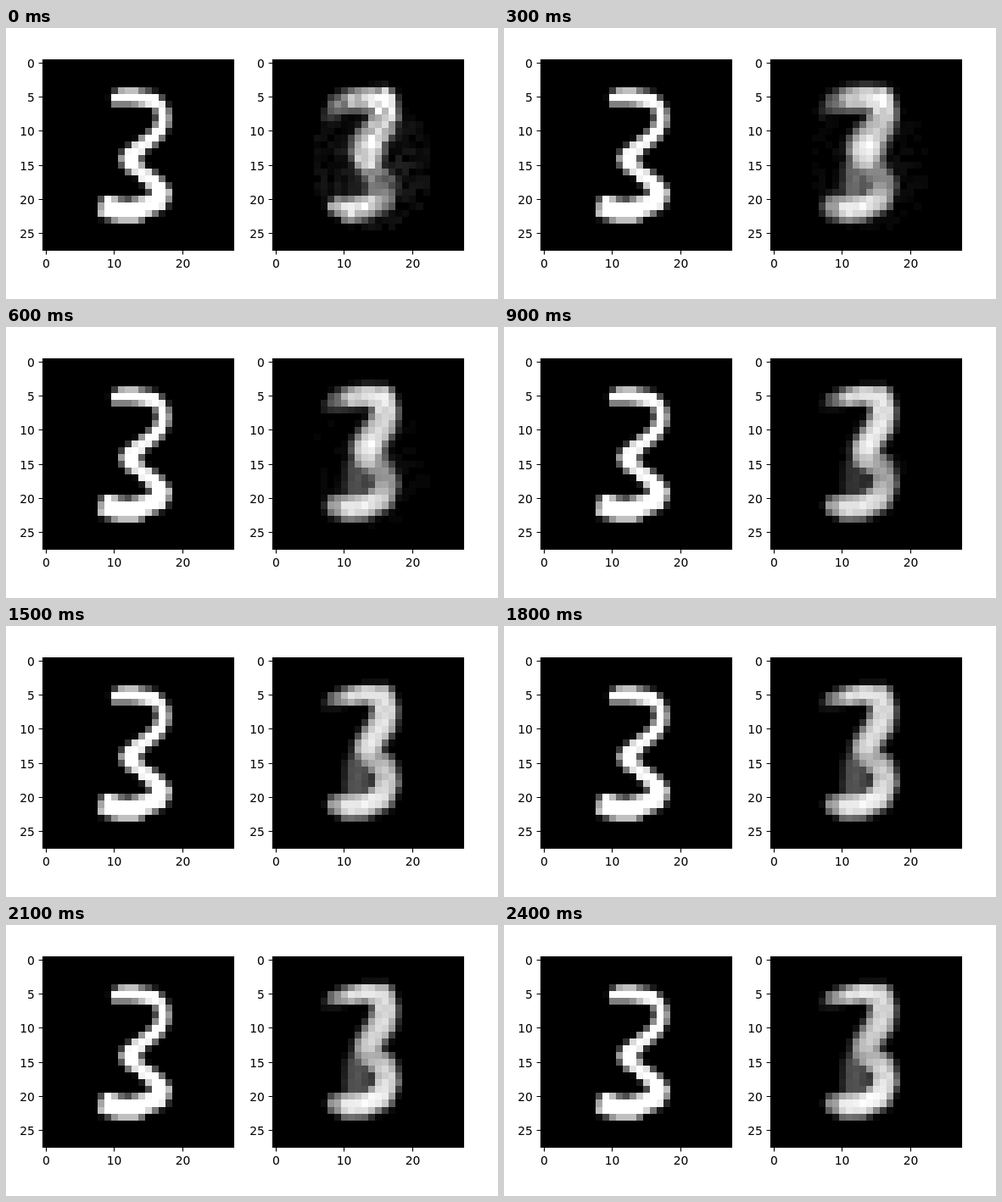
An HTML page with a canvas that plays this animation: 580x320 px, repeating every 3 s.

```html
<!DOCTYPE html>
<html lang="en">
<head>
<meta charset="utf-8">
<title>Learning a digit</title>
<style>
  html, body { margin: 0; width: 100%; height: 100%; overflow: hidden; background: #fff; }
  canvas, svg { position: absolute; left: 0; top: 0; width: 580px; height: 320px; }
  text { font: 13.89px "DejaVu Sans", sans-serif; fill: #000; }
  path { fill: none; stroke: #000; stroke-width: 1.1; }
</style>
</head>
<body>
<canvas id="view" width="580" height="320"></canvas>
<svg id="axes" viewBox="0 0 580 320"></svg>
<script>
const N = 28, CELL = 8.05, TOP = 37.4, LEFT = [43.4, 314.4];
const STEP = 300, LOOP = 3000, LAST = 8;
const ctx = document.getElementById('view').getContext('2d');

// Outline of the crisp digit, in grid units.
const outline = [
  [9.95, 4.9], [10.6, 4.7], [11.5, 4.3], [12, 4.2], [14, 4.2], [14.2, 4.6], [16, 4.85],
  [16.8, 5.1], [17.4, 5.5], [17.6, 6], [18.3, 6.8], [18.5, 7.5], [18.65, 8.5], [18.5, 9.7],
  [18.1, 10.5], [17.7, 11.2], [16.8, 12.2], [15.6, 13], [14.6, 14], [14.2, 14.8],
  [14.6, 15.6], [15.8, 16.2], [17, 17.1], [17.9, 18], [18.5, 18.8], [18.85, 19.5],
  [18.6, 20.5], [18.2, 21.4], [17.2, 22.2], [15.6, 22.8], [14.9, 23.3], [14, 23.65],
  [11, 23.65], [9.5, 23.3], [8.2, 22.9], [8.4, 21], [8.8, 20.2], [9.3, 19.95], [10, 20.1],
  [11, 20.5], [12.5, 20.65], [14.2, 20.3], [15.5, 20], [15.9, 19.4], [15.2, 18.6],
  [14, 17.7], [13.9, 17], [12.4, 16.4], [11.6, 15.4], [11.3, 14.5], [11.7, 13.6],
  [12.6, 12.8], [14.4, 11.5], [16, 10.2], [16.5, 9.4], [16.8, 8.3], [16.5, 7.2],
  [16, 6.9], [14.5, 6.7], [13, 6.45], [11.5, 6.55], [10, 6.45]
];

// Centre line of the blurred digit: rough and settled.
const rough = [
  [7.3, 8], [9.3, 6], [11.3, 5.4], [13.5, 5.4], [15.8, 5.4], [16, 7.5], [15.3, 9.6], [14, 11],
  [13.5, 12.4], [13.4, 13.8], [14, 16], [15.5, 18], [15.5, 20], [12.8, 21.2], [10.8, 21.5], [8.9, 21.1]
];
const settled = [
  [7, 6.2], [8.8, 5.5], [10.8, 5.1], [13.3, 4.8], [15.7, 5.2], [16, 7.3], [15.6, 9.3], [14.4, 11],
  [13.5, 12.7], [13.4, 14], [15.8, 15.5], [16.3, 17.8], [15.4, 20], [12.8, 21.2], [10.5, 21.3], [8.8, 21.1]
];

const thin = [.9, 1.25, 1.3, 1.4, 1.75, 2, 2.05, 2.05, 2.15, 2, 1.9, 1.9, 1.9, 1.85, 1.85, 1.45];
// at: step, mix: rough to settled, bow: grey inside the lower curve
const keys = [
  { at: 0, mix: 0, bow: .12, grain: .4, halo: .13,
    size: [1, 1.7, 1.7, 1.7, 1.9, 2.2, 2.3, 2.3, 2.6, 2.3, 2, 2.6, 2, 1.8, 1.8, 1.3],
    glow: [.15, .5, .7, .9, 1.02, .85, .72, .85, 1, .9, .52, .42, .6, .92, .92, .75] },
  { at: 1, mix: .5, bow: .42, grain: .14, halo: .06,
    size: [1, 1.7, 1.9, 1.9, 1.9, 2.2, 2.3, 2.6, 2.8, 2.5, 2, 2.2, 1.9, 1.9, 1.9, 1.9],
    glow: [.15, .42, .75, .87, .98, .82, .72, .82, .98, .8, .5, .58, .8, .94, .92, .6] },
  { at: 3, mix: 1, bow: .2, grain: .1, halo: .025, size: thin,
    glow: [.06, .4, .85, .9, .9, .9, .9, .9, .95, .78, .6, .68, .84, .9, .88, .65] },
  { at: 5, mix: 1, bow: .33, grain: .1, halo: .02, size: thin,
    glow: [.1, .5, .86, .9, .88, .88, .88, .87, .91, .6, .75, .82, .9, .93, .9, .65] },
  { at: 8, mix: 1, bow: .32, grain: .09, halo: .015, size: thin,
    glow: [.1, .58, .87, .94, .86, .85, .84, .78, .78, .67, .82, .9, .96, .98, .92, .6] }
];

const lerp = (a, b, t) => a + (b - a) * t;
const blend = (a, b, t) => a.map((v, i) => lerp(v, b[i], t));

function rand(i) {
  let h = Math.imul(i + 17, 0x9E3779B1);
  h = Math.imul(h ^ (h >>> 15), 0x85EBCA6B);
  return ((h ^ (h >>> 13)) >>> 0) / 4294967296;
}

function poseAt(step) {
  let i = 0;
  while (i < keys.length - 2 && keys[i + 1].at <= step) i++;
  const a = keys[i], b = keys[i + 1], t = (step - a.at) / (b.at - a.at);
  const pose = { size: blend(a.size, b.size, t), glow: blend(a.glow, b.glow, t) };
  for (const k of ['mix', 'bow', 'grain', 'halo']) pose[k] = lerp(a[k], b[k], t);
  return pose;
}

// Soft brush along one segment whose ends are [x, y, size, glow].
function brush(x, y, a, b) {
  const dx = b[0] - a[0], dy = b[1] - a[1];
  const raw = ((x - a[0]) * dx + (y - a[1]) * dy) / (dx * dx + dy * dy);
  const [px, py, size, glow] = blend(a, b, Math.min(1, Math.max(0, raw)));
  return glow * Math.exp(-((Math.hypot(x - px, y - py) / size) ** 4));
}

function blurred(step) {
  const p = poseAt(step);
  const line = rough.map((q, i) => [...blend(q, settled[i], p.mix), p.size[i], p.glow[i]]);
  const bow = [[12, 15.2, 1.9, p.bow], [11.8, 18.6, 1.9, p.bow]];
  return Array.from({ length: N * N }, (_, i) => {
    const x = i % N, y = Math.floor(i / N);
    let v = brush(x, y, ...bow);
    for (let k = 1; k < line.length; k++) v = Math.max(v, brush(x, y, line[k - 1], line[k]));
    v *= 1 + p.grain * (rand(i) - .55);
    const far = Math.hypot((x - 14) / 9, (y - 15) / 10);
    if (far < 1 && y > 3) v = Math.max(v, p.halo * rand(i + 3000) * (1.5 - far));
    return v < .02 ? 0 : Math.min(1, v);
  });
}

function crisp() {
  const c = document.createElement('canvas');
  c.width = c.height = N;
  const g = c.getContext('2d');
  g.fillStyle = '#fff';
  g.beginPath();
  outline.forEach(q => g.lineTo(...q));
  g.fill();
  const d = g.getImageData(0, 0, N, N).data;
  return Array.from({ length: N * N }, (_, i) => d[i * 4 + 3] / 255);
}

function paint(cells, left) {
  const edge = (o, n) => Math.round(o + n * CELL);
  cells.forEach((v, i) => {
    const c = i % N, r = Math.floor(i / N), g = Math.round(v * 255);
    const x = edge(left, c), y = edge(TOP, r);
    ctx.fillStyle = `rgb(${g},${g},${g})`;
    ctx.fillRect(x, y, edge(left, c + 1) - x, edge(TOP, r + 1) - y);
  });
}

function axes(left) {
  const snap = v => Math.floor(v) + .5;
  const l = snap(left), t = snap(TOP), b = snap(TOP + N * CELL);
  let d = `M${l} ${t}H${snap(left + N * CELL)}V${b}H${l}Z`, labels = '';
  for (let n = 0; n <= 25; n += 5) {
    const y = snap(TOP + (n + .5) * CELL);
    d += `M${l} ${y}h-4.9`;
    labels += `<text x="${l - 9.7}" y="${y + 5.3}" text-anchor="end">${n}</text>`;
    if (n % 10) continue;
    const x = snap(left + (n + .5) * CELL);
    d += `M${x} ${b}v4.9`;
    labels += `<text x="${x}" y="${b + 20.5}" text-anchor="middle">${n}</text>`;
  }
  return `<path d="${d}"/>${labels}`;
}

document.getElementById('axes').innerHTML = LEFT.map(axes).join('');
paint(crisp(), LEFT[0]);
const poses = Array.from({ length: LAST + 1 }, (_, i) => blurred(i));
const start = performance.now();
let shown = -1;

function tick() {
  const step = Math.min(LAST, Math.floor(((performance.now() - start) % LOOP) / STEP));
  if (step !== shown) paint(poses[shown = step], LEFT[1]);
  requestAnimationFrame(tick);
}
tick();
</script>
</body>
</html>
```
